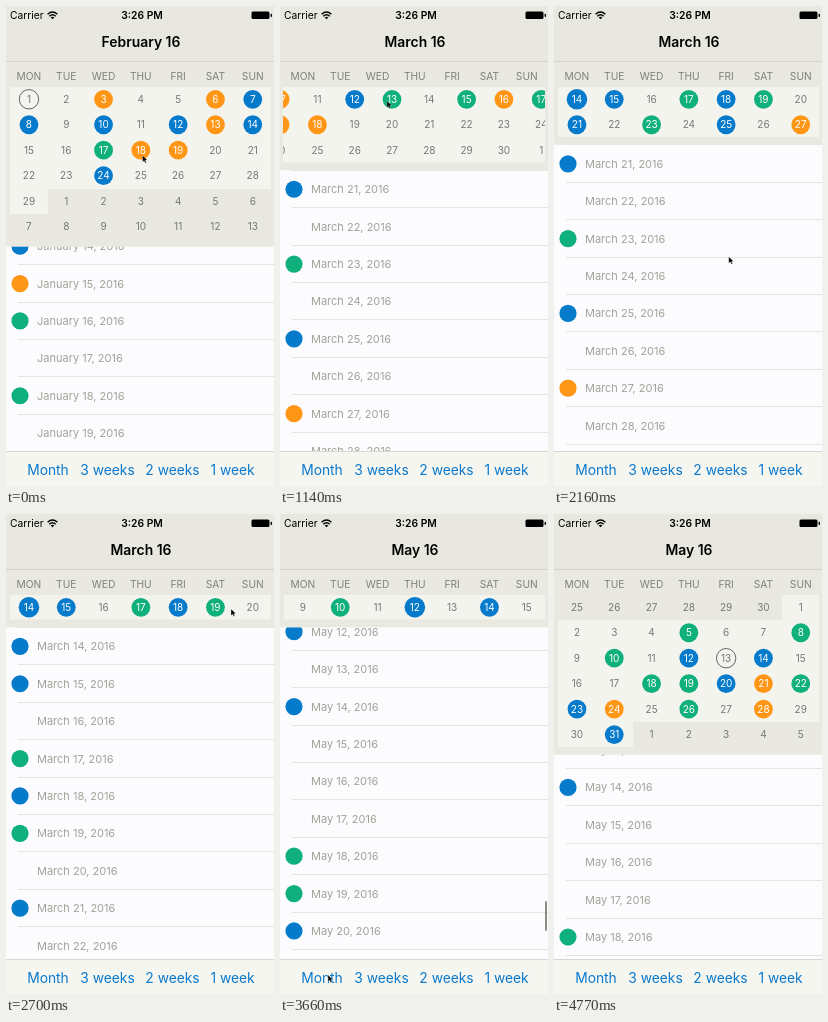
Animation of 268 by 480 pixels, one loop 4800 ms. Source, as an HTML page:

```html
<!DOCTYPE html>
<html lang="en">
<head>
<meta charset="utf-8">
<title>Calendar</title>
<style>
  html, body { margin: 0; width: 100%; height: 100%; overflow: hidden; background: #fcfcfe; }
  svg { display: block; width: 268px; height: 480px; font-family: Inter, Roboto, sans-serif; }
  .mid { text-anchor: middle; }
  .title { font-size: 13.9px; font-weight: 600; }
  .status { font-size: 10.3px; }
  .week { font-size: 10.2px; fill: #7f7f7c; }
  .day { font-size: 10px; fill: #777775; }
  .day .on { fill: #fff; }
  .list { font-size: 11px; fill: #a2a299; }
  .bar { font-size: 13.8px; fill: #0a78cc; }
  .cell { fill: #f4f4ee; shape-rendering: crispEdges; }
</style>
</head>
<body>
<svg viewBox="0 0 268 480">
  <clipPath id="gridClip"><rect id="gridBox" x="3" y="81" width="262" height="152"/></clipPath>
  <rect width="268" height="480" fill="#fcfcfe"/>
  <g id="list" class="list"></g>
  <rect id="thumb" x="265" width="2" height="30" rx="1" fill="#8c8c84"/>
  <rect id="panel" y="55" width="268" fill="#eae9e1"/>
  <g id="week" class="week mid"></g>
  <g clip-path="url(#gridClip)"><g id="grid" class="day mid"></g></g>
  <rect width="268" height="55" fill="#e9e8e0"/>
  <rect y="55" width="268" height="1" fill="#d2d1ca"/>
  <text id="title" class="title mid" x="135" y="41"></text>
  <g class="status">
    <text x="4" y="13">Carrier</text>
    <text class="mid" x="136" y="13" font-weight="600">3:26 PM</text>
  </g>
  <path d="M41.6 8.3Q46.5 3.8 51.4 8.3M43.3 10.2Q46.5 7.2 49.7 10.2" fill="none" stroke="#000" stroke-width="1.4"/>
  <path d="M44.7 11.4Q46.5 9.9 48.3 11.4L46.5 13.3Z"/>
  <rect x="245.5" y="5.5" width="18" height="7.5" rx="1.5"/>
  <rect x="264.6" y="7.7" width="1.4" height="3.2" rx=".7"/>
  <rect y="445" width="268" height="35" fill="#f6f6f1"/>
  <rect y="445" width="268" height="1" fill="#d9d8d0"/>
  <g id="bar" class="bar mid"></g>
  <path id="cursor" d="M0 0V6.5L1.6 5.2L2.7 7.6L3.8 7.1L2.8 4.8L4.8 4.6Z" stroke="#fff" stroke-width=".3"/>
</svg>
<script>
const LOOP = 4800, STEP = 30, SLIDE = 105, SETTLE = 90;
const COL = 37.3, ROW = 25.45, LINE = 37.4, LEFT = 4.3, TOP = 81;
const MONTHS = ['January', 'February', 'March', 'April', 'May', 'June', 'July'];
const COLORS = { b: '#067acb', o: '#ff9616', g: '#10b07c' };

// One letter per marked day, month by month.
const MARKS = [
  '.............bog.g',
  '..o..obb.b.bob..goo....b',
  '....bbgo...o.bb.gbg.b.g.b.o.b.o',
  '.bogggog...bg.gogo',
  '....g..g.g.b.b...ggbogbo.g.o..b'
];

// What the user does. Days are counted from January 1 = 1.
const SWIPES = [[210, 61], [780, 81], [1050, 102], [1740, 88], [2010, 74], [2730, 81], [2941, 88]]
  .map(([t, pick]) => ({ t, pick }));
const DRAGS = [{ t: 3180, time: 440, pos: 133.39 }, { t: 3900, time: 300, pos: 134.63 }];
const BUTTONS = [
  { label: 'Month', x: 42, t: 3690, rows: 6 },
  { label: '3 weeks', x: 101.5, t: 535, rows: 3 },
  { label: '2 weeks', x: 166.5, t: 1410, rows: 2 },
  { label: '1 week', x: 226.5, t: 2370, rows: 1 }
];
const [MONTH, THREE] = BUTTONS;

const $ = id => document.getElementById(id);
const clamp = x => Math.min(1, Math.max(0, x));
const ease = x => x * x * (3 - 2 * x);
const byTime = (a, b) => a.t - b.t;
const monday = n => n - (n + 3) % 7;
const panelEnd = rows => 88 + rows * ROW;

// Runs through moves { t, time, to }, each easing on from where the last one ended.
const follow = (moves, value, t) => moves.reduce(
  (v, m) => v + (m.to - v) * ease(clamp((t - m.t) / m.time)), value);

const scroll = [
  { t: -60, time: 131.2, to: 32 },
  ...SWIPES.map(s => ({ t: s.t + SLIDE, time: SETTLE, to: s.pick })),
  ...DRAGS.map(d => ({ t: d.t, time: d.time, to: d.pos }))
];
const resize = [...BUTTONS].sort(byTime)
  .map(b => ({ t: b.t, time: b === MONTH ? SETTLE : 48, to: panelEnd(b.rows) }));
const thumb = [{ t: 3180, time: 30, to: 1 }, { t: 3680, time: 80, to: 0 }];

// The pointer hurries to the start of the next gesture, waits, then performs it.
const gestures = [
  ...SWIPES.map((s, i) => {
    const back = i > 0 && s.pick < SWIPES[i - 1].pick;
    return { t: s.t, time: SLIDE, from: [back ? 60 : 225, 95], to: [back ? 132 : 100, 95] };
  }),
  ...BUTTONS.map(b => ({ t: b.t, time: 1, from: [b.x + 6, 461], to: [b.x + 6, 461] })),
  ...DRAGS.map(d => ({ t: d.t - 80, time: d.time, from: [132, 345], to: [132, 200] })),
  { t: 4400, time: 100, from: [132, 400], to: [132, 490] }
].sort(byTime);

const pointer = [0, 1].map(axis => {
  let end = 60;
  return gestures.flatMap(g => {
    const reach = { t: end, time: Math.min(100, g.t - end), to: g.from[axis] };
    end = g.t + g.time;
    return [reach, { t: g.t, time: g.time, to: g.to[axis] }];
  });
});

function dateOf(n) {
  const d = new Date(Date.UTC(2016, 0, n));
  const month = d.getUTCMonth(), day = d.getUTCDate();
  return { month, day, color: COLORS[(MARKS[month] || '')[day - 1]] };
}

const text = (x, y, s, attrs = '') => `<text x="${x}" y="${y}" ${attrs}>${s}</text>`;
const dot = (x, y, r, attrs) => `<circle cx="${x}" cy="${y}" r="${r}" ${attrs}/>`;

function page(pick, shift, selected, byMonth) {
  const { month, day } = dateOf(pick);
  const first = monday(byMonth ? pick - day + 1 : pick);
  let cells = '', days = '';
  for (let i = 0; i < 42; i++) {
    const d = dateOf(first + i), inside = !byMonth || d.month === month;
    const left = LEFT + shift + i % 7 * COL, top = TOP + Math.floor(i / 7) * ROW;
    const x = left + COL / 2, y = top + 12.3;
    const picked = inside && first + i === selected, marked = inside && d.color;
    if (inside) cells += `<rect class="cell" x="${left}" y="${top}" width="${COL}" height="${ROW}"/>`;
    if (marked) days += dot(x, y, picked ? 10.3 : 9.4, `fill="${d.color}"`);
    else if (picked) days += dot(x, y, 9.7, 'fill="none" stroke="#66656a"');
    days += text(x, y + 3.6, d.day, marked ? 'class="on"' : '');
  }
  return cells + days;
}

function drawList(pos, top) {
  let out = '';
  for (let n = Math.floor(pos) - 1; ; n++) {
    const y = top + 18.9 + (n - pos) * LINE;
    if (y > 465) break;
    const d = dateOf(n);
    if (d.color) out += dot(14, y, 8.6, `fill="${d.color}"`);
    out += text(31, y + 4, `${MONTHS[d.month]} ${d.day}, 2016`);
    out += `<rect x="12" y="${Math.round(y + 18)}" width="256" height="1" fill="#e6e5dc"/>`;
  }
  $('list').innerHTML = out;
}

function drawGrid(t, pos) {
  const byMonth = t < THREE.t + 60 || t >= MONTH.t;
  const done = SWIPES.filter(s => s.t + SLIDE <= t).length;
  const next = SWIPES[done];
  const listLeads = t >= DRAGS[0].t;
  const selected = listLeads ? Math.floor(pos + 1e-6) : done ? SWIPES[done - 1].pick : 32;
  let shift = 0, incoming = '';
  if (next && t > next.t) {
    const dir = Math.sign(next.pick - selected), width = 7 * COL;
    shift = -dir * width * ease((t - next.t) / SLIDE);
    incoming = page(next.pick, shift + dir * width, selected, byMonth);
  }
  $('grid').innerHTML = page(selected, shift, selected, byMonth) + incoming;
  $('title').textContent = MONTHS[dateOf(selected).month] + ' 16';
}

function draw(t) {
  const bottom = follow(resize, panelEnd(6), t), pos = follow(scroll, 1, t);
  drawList(pos, bottom);
  drawGrid(t, pos);
  $('panel').setAttribute('height', bottom - 55);
  $('gridBox').setAttribute('height', bottom - 8 - TOP);
  $('thumb').setAttribute('y', 113 + pos * 2.054);
  $('thumb').setAttribute('opacity', follow(thumb, 0, t));
  $('cursor').setAttribute('transform',
    `translate(${follow(pointer[0], 136.5, t)} ${follow(pointer[1], 149.5, t)})`);
  BUTTONS.forEach((b, i) => {
    $('bar').children[i].setAttribute('opacity', t >= b.t && t < b.t + 60 ? 0.5 : 1);
  });
}

$('week').innerHTML = ['MON', 'TUE', 'WED', 'THU', 'FRI', 'SAT', 'SUN']
  .map((s, i) => text(LEFT + (i + 0.5) * COL, 73.7, s)).join('');
$('bar').innerHTML = BUTTONS.map(b => text(b.x, 469, b.label)).join('');

// The picture advances in whole steps, like the screen recording it looks like.
const origin = performance.now();
function tick() {
  const t = (performance.now() - origin + 2) % LOOP;
  draw(Math.floor(t / STEP) * STEP);
  requestAnimationFrame(tick);
}
draw(0);
requestAnimationFrame(tick);
</script>
</body>
</html>
```
